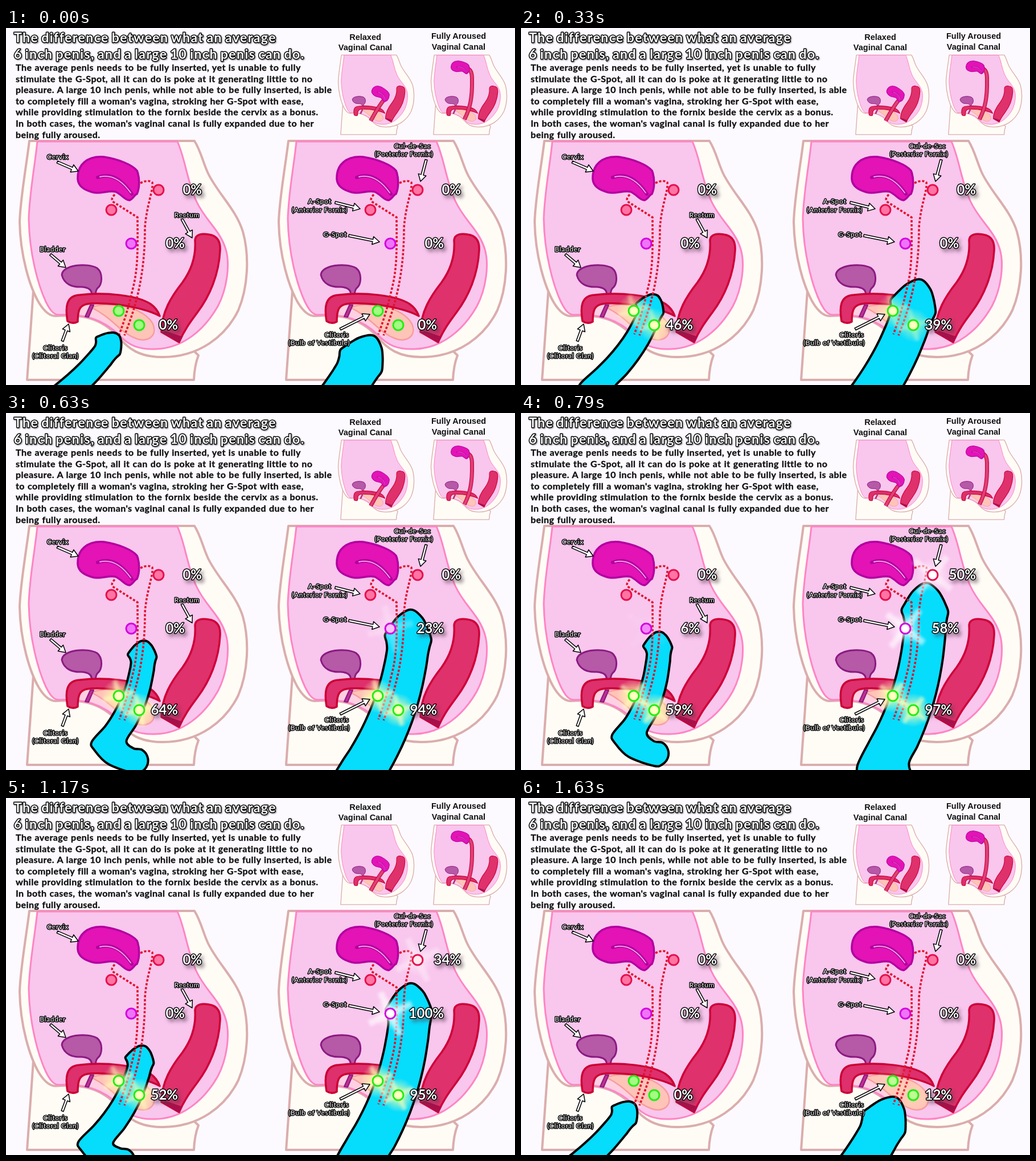
Recreate the animation shown at these times as an HTML page. Size 894 by 626 pixels, loop 1680 ms.

```html
<!DOCTYPE html>
<html lang="en">
<head>
<meta charset="utf-8">
<title>Anatomy diagram</title>
<style>
html, body { margin: 0; width: 100%; height: 100%; overflow: hidden; background: #fcfaff; }
svg { display: block; width: 894px; height: 626px; }
text { font-family: Lato, "Open Sans", sans-serif; font-weight: 700; }
.title { font-size: 23px; letter-spacing: 1.45px; word-spacing: -2px; }
.body { font-size: 16px; letter-spacing: .45px; word-spacing: .7px; fill: #111; stroke: #111; stroke-width: .35px; }
.head { font: bold 14.5px "Liberation Sans", Arial, sans-serif; text-anchor: middle; fill: #111; }
.label { font-size: 12px; font-weight: 400; letter-spacing: .7px; text-anchor: middle; }
.pct { font-size: 24px; text-anchor: end; filter: drop-shadow(4px 5px 3px #5038488c); }
.title, .label, .pct { fill: #fff; stroke: #000; stroke-width: 2.8px; paint-order: stroke; stroke-linejoin: round; }
.title { filter: drop-shadow(1px 1px 1px #0008); }
.dots { fill: none; stroke: #e4102c; stroke-width: 3.6; stroke-dasharray: 4 3; }
.arrow { fill: #fff; stroke: #000; stroke-width: 1.5; stroke-linejoin: round; }
.shaft { fill: #06dcfc; stroke: #000; stroke-width: 4; stroke-linejoin: round; }
</style>
</head>
<body>
<svg id="stage" viewBox="0 0 894 626">
  <defs>
    <radialGradient id="warm">
      <stop offset="0" stop-color="#ffffb0"/><stop offset=".4" stop-color="#ffffa0" stop-opacity=".6"/>
      <stop offset="1" stop-color="#ffffc0" stop-opacity="0"/>
    </radialGradient>
    <radialGradient id="cool">
      <stop offset="0" stop-color="#fff"/><stop offset=".4" stop-color="#fff" stop-opacity=".5"/>
      <stop offset="1" stop-color="#fff" stop-opacity="0"/>
    </radialGradient>
    <filter id="soft" x="-50%" y="-50%" width="200%" height="200%"><feGaussianBlur stdDeviation="2.5"/></filter>

    <g id="torso" stroke-linejoin="round">
      <path d="M49 447L37 617H330Q331 592 338 574L240 480Z" fill="#fffcf6" stroke="#dbadad" stroke-width="4"/>
      <path d="M41 198C36 240 25 300 24 340C25 400 42 455 58 482C66 495 75 505 87 505C130 502 165 506 198 542
        C215 563 235 577 275 577C340 577 386 540 408 495C425 455 428 400 416 357C404 318 372 290 355 255
        C346 236 342 215 331 198Z" fill="#fffcf6" stroke="#dbadad" stroke-width="4"/>
      <path d="M55 199C51 240 41 290 40 335C41 395 56 450 70 480C76 492 82 502 92 503C130 501 166 507 198 538
        C215 556 232 564 262 563C310 562 348 530 372 488C388 458 394 415 386 388C376 354 350 338 334 303
        C318 268 315 230 301 199Z" fill="#f9c6ee" stroke="#ff84c4" stroke-width="3"/>
      <path d="M128 488Q190 478 240 492L210 545Q170 505 128 503Z" fill="#ffd0e2"/>
      <path d="M150 490C180 478 242 488 258 519C267 540 248 552 230 545C200 535 190 510 150 490Z"
        fill="#ffc4b8" stroke="#f79c9c" stroke-width="2.5"/>
      <path d="M148 486L139 506L145 507L154 486Z" fill="#c0308f" stroke="#8b1a82" stroke-width="2"/>
      <path d="M98 433C99 415 143 411 160 421C171 430 169 450 161 456C157 460 158 464 157 469L150 469
        C152 460 146 455 133 454C116 455 102 449 98 433Z" fill="#b659a6" stroke="#8b1a82" stroke-width="3"/>
      <path d="M332 372C333 361 345 360 356 362C371 364 377 374 376 390C374 432 358 470 336 499
        C324 515 313 530 304 551L273 533C273 498 291 470 310 446C326 424 334 400 332 372Z"
        fill="#df316c" stroke="#cf0038" stroke-width="3.5"/>
      <path d="M280 531L309 541L304 551L273 533Z" fill="#a8104c"/>
    </g>
    <path id="arch" d="M108 514C104 490 105 469 130 468C172 463 230 468 254 484C264 491 268 499 270 505
      C250 494 200 481 150 483C130 484 126 492 126 515Q117 520 108 514Z"
      fill="#dd306c" stroke="#cc0034" stroke-width="3.5" stroke-linejoin="round"/>
    <g id="womb" stroke-linecap="round">
      <path d="M126 265C125 240 142 224 172 226C198 230 222 240 230 250C235 262 235 280 230 291
        C226 292 223 300 217 302C208 302 204 292 192 287C180 284 165 292 152 288C138 284 127 278 126 265Z"
        fill="#e313b6" stroke="#b300a0" stroke-width="3.5" stroke-linejoin="round"/>
      <path d="M161 262C184 253 204 266 221 291" fill="none" stroke="#b300a0" stroke-width="6"/>
      <path d="M165 261C186 256 204 268 219 289" fill="none" stroke="#f6b0e6" stroke-width="1.8"/>
    </g>
  </defs>
  <rect width="894" height="626" fill="#fcfaff"/>
</svg>
<script>
const stage = document.getElementById('stage');
const LOOP = 1680, STEPS = 40;
const BEATS = [0, 8, 15, 23, 28, 32, 39]; // steps at which the key values below hold

const text = (cls, x, y, s) => `<text class="${cls}" x="${x}" y="${y}">${s}</text>`;
const lines = (cls, x, y, gap, list) => list.map((s, i) => text(cls, x, y + i * gap, s)).join('');
const use = (id, t = '') => `<use href="#${id}" transform="${t}"/>`;
const clamp = v => Math.max(0, Math.min(1, v));

function arrow(x1, y1, x2, y2) {
  const len = Math.hypot(x2 - x1, y2 - y1), a = Math.atan2(y2 - y1, x2 - x1) * 180 / Math.PI;
  return `<path class="arrow" transform="translate(${x1} ${y1}) rotate(${a})"
    d="M0 -2H${len - 12}V-7L${len} 0L${len - 12} 7V2H0Z"/>`;
}

function mini(x, wombMove, canal) {
  const tube = (color, w) => `<path d="${canal}" fill="none" stroke="${color}" stroke-width="${w}"/>`;
  return `<g transform="translate(${x} -18.7) scale(.3333)">${use('torso')}${use('arch')}
    ${tube('#c80038', 21)}${tube('#df4078', 14)}${use('womb', wombMove)}</g>`;
}

const red = { fill: '#ff74a4', line: '#e6104c', glow: 'cool', light: '#fff' };
const violet = { ...red, fill: '#ee74f8', line: '#d400de' };
const green = { fill: '#a4fb84', line: '#22ee12', glow: 'warm', light: '#ffffbe' };
const spots = [
  { ...red, x: 185, y: 319 },
  { ...red, x: 268, y: 284, key: 'fornix', right: 344 },
  { ...violet, x: 220, y: 378, key: 'front', right: 314 },
  { ...green, x: 198, y: 496, key: 'entry' },
  { ...green, x: 234, y: 521, key: 'entry', right: 302 }
];

// tip and pct hold one value per beat; flare is the head's half width on each side
const panels = [
  {
    dx: 0, top: 384, x0: 243, bend: 108, span: 242, swing: 15,
    length: 195, head: 26, flare: [28, 23], body: 20, size: 1,
    tip: [536, 467, 399, 384, 434, 485, 534],
    pct: { front: [0, 0, 0, 11, 0, 0, 0], entry: [0, 46, 64, 54, 52, 43, 0] }
  },
  {
    dx: 455, top: 300, x0: 712, bend: 84, span: 326, swing: 27,
    length: 340, head: 48, flare: [43, 39], body: 35, size: 1.35,
    tip: [540, 441, 345, 271, 325, 403, 525],
    pct: { fornix: [0, 0, 0, 99, 34, 0, 0], front: [0, 0, 23, 92, 100, 35, 0], entry: [0, 39, 94, 99, 95, 91, 12] }
  }
];

// Value between beats, wrapping around the loop
function between(vals, k, eased) {
  const n = vals.length;
  const at = i => [BEATS[(i + n) % n] + Math.floor(i / n) * STEPS, vals[(i + n) % n]];
  const i = BEATS.findLastIndex(b => b <= k);
  const [p, a, b, c] = [at(i - 1), at(i), at(i + 1), at(i + 2)];
  const h = b[0] - a[0], u = (k - a[0]) / h, v = 1 - u;
  if (!eased) return a[1] * v + b[1] * u;
  const m = (b[1] - p[1]) / (b[0] - p[0]) * h, w = (c[1] - a[1]) / (c[0] - a[0]) * h;
  return a[1] * v * v * (1 + 2 * u) + m * u * v * v + b[1] * u * u * (3 - 2 * u) - w * u * u * v;
}

function closedCurve(pts) {
  const n = pts.length, at = i => pts[(i + n) % n];
  let d = `M${pts[0]}`;
  for (let i = 0; i < n; i++) {
    const [p, a, b, c] = [at(i - 1), at(i), at(i + 1), at(i + 2)];
    const near = [0, 1].map(j => a[j] + (b[j] - p[j]) / 6), far = [0, 1].map(j => b[j] - (c[j] - a[j]) / 6);
    d += `C${near} ${far} ${b}`;
  }
  return d + 'Z';
}

// Rounded head, a neck behind it, then a slowly widening body
function halfWidth(p, s, flare) {
  if (s < p.head) return flare * Math.sqrt(s / p.head);
  const body = p.body * (1 + .15 * s / p.length);
  return body + (flare - body) * Math.exp(-(((s - p.head) / (p.head * .3)) ** 2));
}

// The outline slides along one bent spine and swings aside when it is low
function outline(p, k) {
  const tip = between(p.tip, k, true), sway = p.swing * clamp((tip - 480) / 60);
  const rel = y => Math.max(0, (y - p.top) / p.span);
  const spine = y => p.x0 - sway - p.bend * rel(y) ** 2.5;
  const slope = y => -p.bend * 2.5 / p.span * rel(y) ** 1.5;
  const walk = s => {
    let y = tip;
    for (let i = 0; i < 60; i++) y += s / 60 / Math.hypot(1, slope(y));
    return y;
  };
  const side = dir => {
    const pts = [];
    for (let s = 1; s < p.length - 15; s += s < 2 * p.head ? p.head / 4 : 30) {
      const y = walk(s), m = slope(y), w = dir * halfWidth(p, s, p.flare[dir < 0 ? 0 : 1]) / Math.hypot(1, m);
      pts.push([spine(y) + w, y - w * m]);
    }
    return pts;
  };
  const ry = walk(p.length), rx = spine(ry);
  const base = [[-29, -3], [-24, 12], [0, 36]];
  for (let a = 100; a >= -100; a -= 40) {
    const t = a * Math.PI / 180;
    base.push([48 + 22 * Math.cos(t), 30 + 22 * Math.sin(t)]);
  }
  return closedCurve([
    ...side(-1),
    ...base.map(([x, y]) => [rx + x * p.size, ry + y * p.size]),
    ...side(1).reverse()
  ]);
}

function spot(s) {
  const r = s.glow === 'warm' ? 28 : 41, w = r / 7;
  const glow = s.key ? `<g data-glow="${s.key}" opacity="0"><circle r="30" fill="url(#${s.glow})"/>
    <path d="M${-r} 0H${r}M0 ${-r}V${r}" stroke="${s.light}" stroke-width="${2 * w}" opacity=".6" filter="url(#soft)"/></g>` : '';
  const lit = s.key ? `<circle data-lit="${s.key}" r="8" fill="${s.light}" opacity="0"/>` : '';
  return `<g transform="translate(${s.x} ${s.y})">${glow}<circle r="9" fill="${s.fill}"/>${lit}
    <circle r="9" fill="none" stroke="${s.line}" stroke-width="3"/></g>`;
}

const panel = p => `<g class="panel">
  <g transform="translate(${p.dx})">${use('torso')}${use('arch')}${use('womb')}</g>
  <path class="shaft"/>
  <g transform="translate(${p.dx})">
    <path class="dots" d="M236 272Q250 265 257 271C259 285 247 310 244 350C244 425 232 480 208 539"/>
    <path class="dots" d="M191 292Q182 301 190 306L231 332C231 380 233 420 222 460Q213 500 199 537"/>
    ${spots.map(spot).join('')}
  </g></g>`;

const counters = p => `<g class="counters" transform="translate(${p.dx})">` + spots.filter(s => s.right)
  .map(s => `<text class="pct" data-key="${s.key}" x="${s.right}" y="${s.y + 8}"></text>`).join('') + '</g>';

stage.insertAdjacentHTML('beforeend', [
  lines('title', 14, 25, 28.5, ['The difference between what an average', '6 inch penis, and a large 10 inch penis can do.']),
  lines('body', 17, 75, 19.6, [
    'The average penis needs to be fully inserted, yet is unable to fully',
    'stimulate the G-Spot, all it can do is poke at it generating little to no',
    'pleasure. A large 10 inch penis, while not able to be fully inserted, is able',
    "to completely fill a woman's vagina, stroking her G-Spot with ease,",
    'while providing stimulation to the fornix beside the cervix as a bonus.',
    "In both cases, the woman's vaginal canal is fully expanded due to her",
    'being fully aroused.'
  ]),
  lines('head', 631, 21, 18, ['Relaxed', 'Vaginal Canal']),
  lines('head', 795, 19, 19, ['Fully Aroused', 'Vaginal Canal']),
  mini(575.5, 'translate(75 168) rotate(20 180 263) scale(.9)', 'M268 430Q235 470 195 545'),
  mini(738.5, 'translate(16 26) scale(.9)', 'M212 270Q242 272 240 330C242 420 230 480 200 537'),
  ...panels.map(panel),
  arrow(90, 235, 127, 251), arrow(78, 397, 105, 420), arrow(309, 335, 327, 368), arrow(99, 549, 110, 519),
  arrow(738, 231, 728, 269), arrow(578, 306, 622, 317), arrow(602, 364, 656, 375), arrow(587, 528, 639, 502),
  text('label', 91, 230, 'Cervix'), text('label', 82, 392, 'Bladder'), text('label', 318, 332, 'Rectum'),
  lines('label', 87, 565, 14, ['Clitoris', '(Clitoral Glan)']),
  text('label', 714, 211, 'Cul-de-Sac'), text('label', 699, 225, '(Posterior Fornix)'),
  lines('label', 551, 308, 15, ['A-Spot', '(Anterior Fornix)']),
  text('label', 578, 366, 'G-Spot'),
  text('label', 581, 542, 'Clitoris'), text('label', 550, 556, '(Bulb of Vestibule)'),
  ...panels.map(counters)
].join(''));

const views = panels.map((p, i) => {
  const root = stage.querySelectorAll('.panel')[i];
  return {
    p, shaft: root.querySelector('.shaft'),
    glows: root.querySelectorAll('[data-glow]'), lits: root.querySelectorAll('[data-lit]'),
    counts: stage.querySelectorAll('.counters')[i].querySelectorAll('text')
  };
});

function draw(k) {
  for (const { p, shaft, glows, lits, counts } of views) {
    const level = key => p.pct[key] ? Math.round(between(p.pct[key], k)) : 0;
    shaft.setAttribute('d', outline(p, k));
    for (const g of glows) {
      g.setAttribute('opacity', clamp(level(g.dataset.glow) / 60));
      g.lastElementChild.setAttribute('transform', `rotate(${(k - 23) * 13})`);
    }
    for (const c of lits) c.setAttribute('opacity', clamp(level(c.dataset.lit) / 40));
    for (const t of counts) t.textContent = level(t.dataset.key) + '%';
  }
}

let shown = -1;
function tick() {
  const t = performance.now() % LOOP;
  const k = Math.min(STEPS - 1, Math.floor((t + 8) / 41.8));
  if (k !== shown) draw(shown = k);
  requestAnimationFrame(tick);
}
tick();
</script>
</body>
</html>
```
